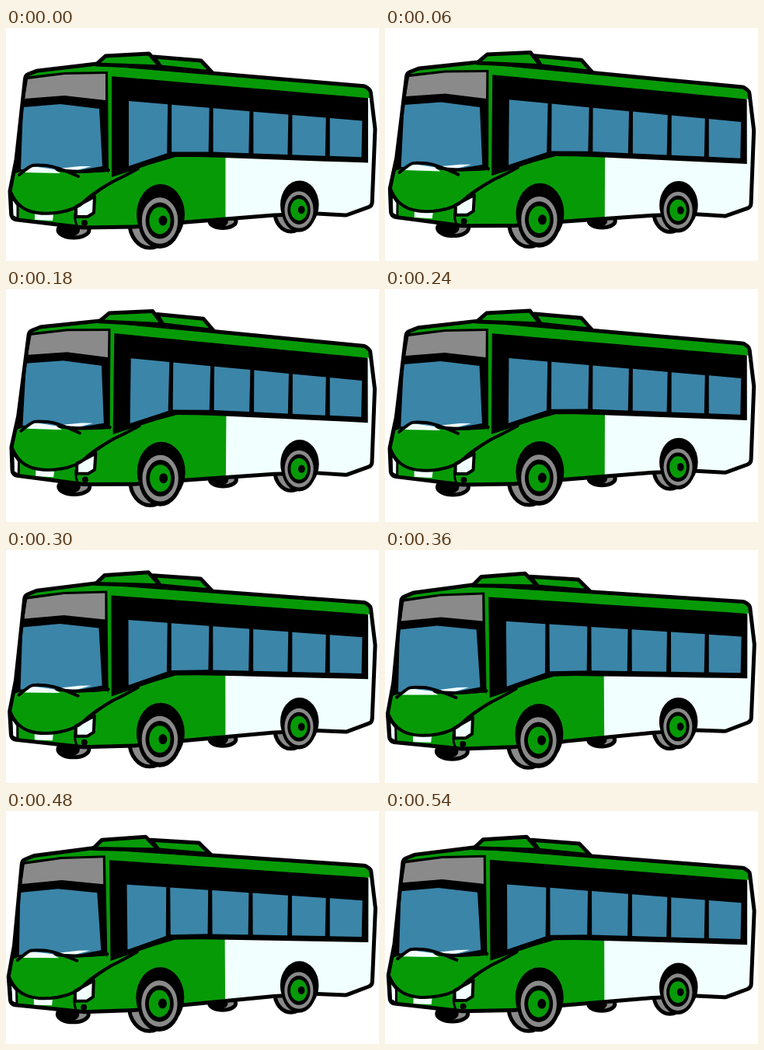
Write an HTML page with a canvas that moves like this. It is 480x300 px and loops after 0.57 s.

```html
<!DOCTYPE html>
<html lang="en">
<head>
<meta charset="utf-8">
<title>Bus</title>
<style>
html, body { margin: 0; width: 100%; height: 100%; overflow: hidden; background: #fff; }
canvas { display: block; }
</style>
</head>
<body>
<canvas id="stage" width="480" height="300"></canvas>
<script>
const ctx = document.getElementById('stage').getContext('2d');
const GREEN = '#079a07', GRAY = '#8a8a8a', BLUE = '#3b85a9', WHITE = '#f1ffff', BLACK = '#000';
const LOOP = 570, STEP = 30;
const BAND_START = 136, BAND_END = 466, SPLIT = 282.5;
let sway = 0, drop = 0;

// The side of the bus follows a few lines in perspective.
const header = x => 94 + 0.085 * (x - 158);
const sill = x => 159 + 0.035 * Math.max(0, x - 250) + 0.33 * Math.max(0, 215 - x);
const roof = x => header(x) - 45;
const windowLeft = i => 158 + 56 * i - 0.85 * i * i;

// Sideways lean is strongest at the top front; the body pitches while it bounces.
function warp(x, y) {
  const lean = (1 - x / 420) * (6.8 - 0.022 * y) + Math.max(0, 50 - y) * 0.1;
  const bounce = (1.5 + 0.004 * x) * drop;
  const pitch = (0.018 * x - 4.8) * sway;
  return [x + lean * sway, y + bounce + pitch];
}

function paint(fill, width) {
  if (fill) {
    ctx.fillStyle = fill;
    ctx.fill();
  }
  if (width) {
    ctx.lineWidth = width;
    ctx.stroke();
  }
}

function toPoints(coords) {
  const points = [];
  for (let i = 0; i < coords.length; i += 2) points.push(warp(coords[i], coords[i + 1]));
  return points;
}

function poly(coords, fill, width, radius = 0) {
  const points = toPoints(coords), [first] = points, last = points[points.length - 1];
  ctx.beginPath();
  ctx.moveTo((first[0] + last[0]) / 2, (first[1] + last[1]) / 2);
  points.forEach((p, i) => ctx.arcTo(...p, ...points[(i + 1) % points.length], radius));
  ctx.closePath();
  paint(fill, width);
}

function curve(coords, width) {
  const points = toPoints(coords), last = points.length - 1;
  ctx.beginPath();
  ctx.moveTo(...points[0]);
  for (let i = 1; i < last; i++) {
    const [x, y] = points[i], [nx, ny] = points[i + 1];
    if (i === last - 1) ctx.quadraticCurveTo(x, y, nx, ny);
    else ctx.quadraticCurveTo(x, y, (x + nx) / 2, (y + ny) / 2);
  }
  paint(null, width);
}

function oval(x, y, rx, ry, fill, width) {
  ctx.beginPath();
  ctx.ellipse(...warp(x, y), rx, ry, 0, 0, Math.PI * 2);
  paint(fill, width);
}

// Points along a line y = f(x), in either direction.
function trace(f, from, to, count = 12) {
  const coords = [];
  for (let i = 0; i <= count; i++) {
    const x = from + (to - from) * i / count;
    coords.push(x, f(x));
  }
  return coords;
}

function drawShell(fill, width) {
  poly([25, 61, 40, 55, ...trace(roof, 120, 462, 3), 469, 80, 475, 130, 471, 229,
    438, 241, 400, 239, 345, 241, 232, 250, 165, 256, 100, 257, 7, 246, 5, 210, 13, 170],
    fill, width, 7);
}

function drawBand() {
  poly([...trace(x => header(x) - 30, BAND_START, BAND_END),
    ...trace(x => sill(x) + 7, BAND_END, BAND_START)], BLACK);
  curve([170, 181, 150, 192, 130, 201, 113, 214], 4);
  for (let i = 0; i < 6; i++) {
    const left = windowLeft(i), right = windowLeft(i + 1) - 5;
    poly([left, header(left), right, header(right), right - 1, sill(right), left, sill(left)], BLUE);
  }
}

function drawFace() {
  poly([22, 63, 75, 57, 131, 56, 132, 188, 6, 190], BLACK);
  poly([28, 66, 75, 60, 128, 59, 128, 93, 75, 87, 24, 91], GRAY);
  poly([22, 102, 70, 98, 120, 104, 124, 178, 95, 183, 19, 182], BLUE);
  poly([12, 187, 30, 181, 90, 187, 131, 185, 136, 198, 113, 213, 87, 232, 46, 237,
    14, 227, 6, 211], GREEN);
  poly([24, 186, 34, 178, 62, 182, 70, 187], WHITE);
  poly([66, 181, 95, 178, 110, 178, 88, 184], WHITE);
  curve([66, 182, 85, 187, 132, 183], 4);
  curve([17, 189, 30, 178, 38, 176, 64, 178, 93, 191], 4);
}

function drawBumper() {
  poly([7, 217, 15, 228, 15, 246, 8, 242], WHITE, 3);
  poly([90, 230, 114, 217, 113, 238, 105, 243, 90, 243], WHITE, 4);
  poly([37, 239, 61, 240, 60, 248, 37, 247], WHITE);
  curve([6, 211, 14, 230, 46, 241, 90, 234, 111, 213, 137, 198], 4);
  curve([90, 234, 87, 244, 91, 254], 3);
  oval(101, 251, 4, 4, BLACK);
}

function drawBody() {
  ctx.save();
  drawShell(GREEN);
  ctx.clip();
  poly([SPLIT, 160, 464, 160, 464, 90, 480, 90, 480, 250, SPLIT, 250], WHITE);
  drawBand();
  drawFace();
  drawBumper();
  ctx.restore();
  drawShell(null, 5);
}

function drawHatches() {
  poly([190, 37, 251, 42, 265, 57, 199, 50], GREEN, 5);
  poly([116, 47, 128, 36, 184, 33, 199, 50], GREEN, 5);
}

function drawFarWheel(x, y, size) {
  oval(x, y, 20 * size, 10 * size, GRAY, 5);
  oval(x - 6 * size, y, 14 * size, 9 * size, BLACK);
}

function drawTread({ x, y, size }) {
  oval(x - 13 * size, y + 3 * size, 26 * size, 32 * size, GRAY, 5);
}

function drawWheel({ x, y, size }) {
  oval(x + size, y - 8 * size, 31 * size, 39 * size, BLACK);
  [BLACK, GRAY, BLACK, GREEN].forEach((color, i) =>
    oval(x, y, (28 - 4.8 * i) * size, (36 - 6.2 * i) * size, color));
  oval(x + 4 * size, y, 5.5 * size, 6.5 * size, BLACK);
}

function drawBus() {
  const wheels = [{ x: 198, y: 248, size: 1 }, { x: 377, y: 234, size: 0.8 }];
  drawFarWheel(87, 260, 1);
  drawFarWheel(279, 249, 0.85);
  wheels.forEach(drawTread);
  drawBody();
  drawHatches();
  wheels.forEach(drawWheel);
}

function frame(now) {
  const time = Math.floor(now / STEP) * STEP % LOOP;
  const angle = time / LOOP * Math.PI * 2;
  sway = Math.sin(angle);
  drop = Math.cos(angle) - 1;
  ctx.fillStyle = '#fff';
  ctx.fillRect(0, 0, 480, 300);
  ctx.strokeStyle = BLACK;
  ctx.lineJoin = ctx.lineCap = 'round';
  drawBus();
  requestAnimationFrame(frame);
}
requestAnimationFrame(frame);
</script>
</body>
</html>
```
